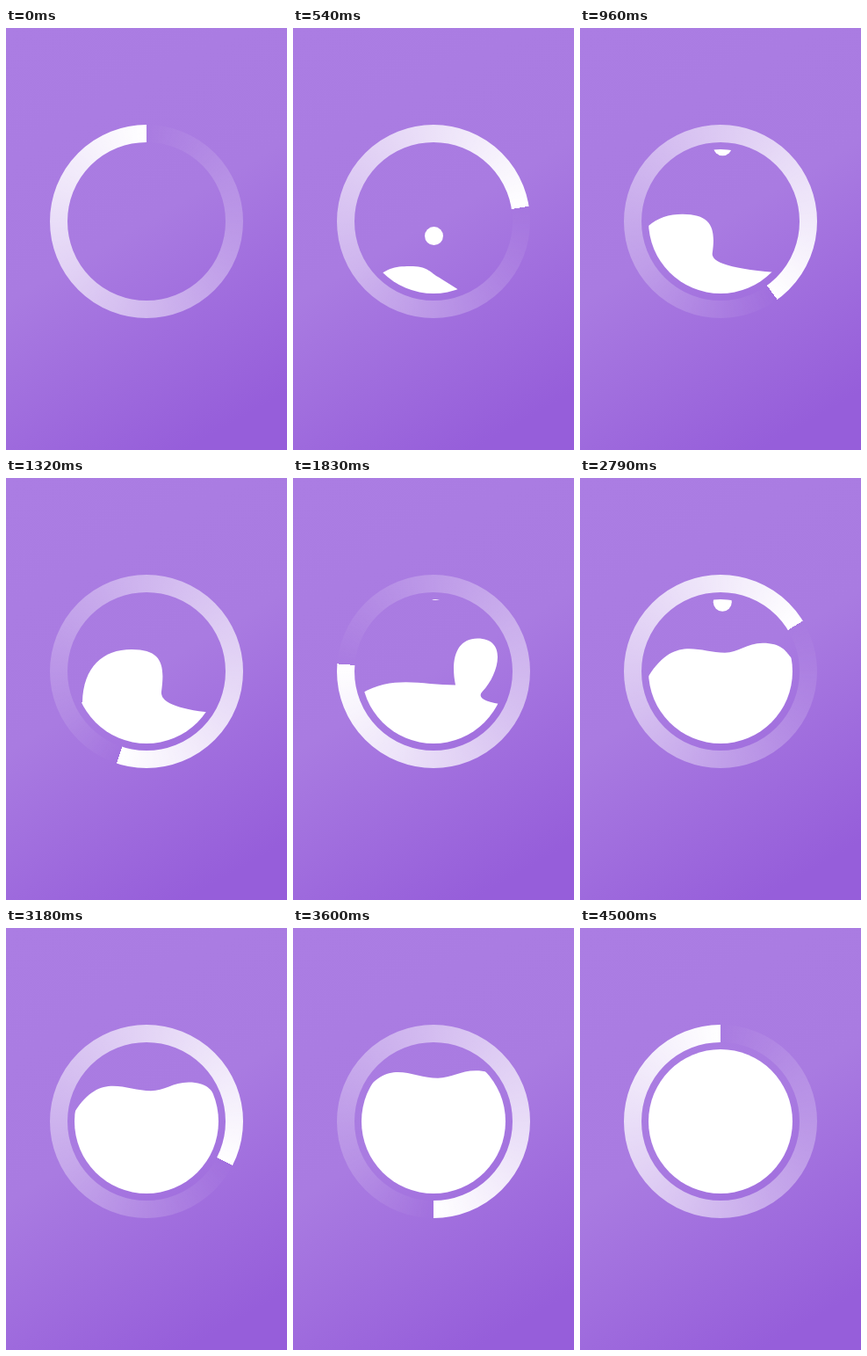
Animation, 320 px wide and 480 px high, one loop 4530 ms. Source, as an HTML page with a canvas:

```html
<!DOCTYPE html>
<html lang="en">
<head>
<meta charset="utf-8">
<title>Liquid loader</title>
<style>
  html, body { margin: 0; width: 100%; height: 100%; overflow: hidden; }
  body { background: #a87ae0; }
  canvas {
    display: block;
    width: 320px;
    height: 480px;
    background: linear-gradient(150deg, #ab7de3 0%, #a97be1 47%, #965eda 90%);
  }
</style>
</head>
<body>
<canvas id="stage" width="320" height="480"></canvas>
<script>
const ctx = document.getElementById('stage').getContext('2d');
const LOOP = 4530, STEP = 30;
const CX = 160, CY = 220, RING = 100, BOWL = 82;
const LEFT = 70, RIGHT = 245;

// Each pose has one crest between a neck and a foot, heights relative to the level.
// sides: left height, lift of the left shoulder, right height.
// out, back: curve handles at the neck and the foot.
const swell = {
  sides: [30, 10, 50], neck: [92, 4], out: [13, -14],
  crest: [133, -12.5], foot: [165, -0.5], back: [-10, -6]
};
const breaker = {
  sides: [20, 0, 11], neck: [87, -2], out: [1, -40],
  crest: [143, -62], foot: [177, -14], back: [4, -30]
};
const blob = {
  sides: [10.5, 28, 19], neck: [185, -4], out: [-6, -30],
  crest: [210, -57], foot: [216, 3], back: [17, -17]
};
const calm = {
  sides: [33, 65, 6], neck: [165, -8], out: [15, 0],
  crest: [208, -19], foot: [240, -3], back: [-6, -7]
};

// Slides a pose sideways, scales its height and tilts it
function vary(pose, dx, scale, tilt = 0) {
  const lean = x => (x - 170) * tilt;
  const move = ([x, y]) => [x + dx, y * scale + lean(x)];
  const [left, lift, right] = pose.sides;
  return {
    ...pose,
    sides: [left * scale + lean(LEFT), lift * scale, right * scale + lean(RIGHT)],
    neck: move(pose.neck), crest: move(pose.crest), foot: move(pose.foot),
    out: [pose.out[0], pose.out[1] * scale],
    back: [pose.back[0], pose.back[1] * scale]
  };
}

const waves = [
  [0, vary(swell, -25, 0)],
  [540, swell],
  [840, vary(breaker, -35, 0.9)],
  [1320, breaker],
  [1830, blob],
  [2190, vary(blob, 14, 0.6)],
  [2640, calm],
  [2790, calm],
  [3600, vary(calm, 0, 1, 0.06)]
];

const mix = (a, b, k) => a + (b - a) * k;

function poseAt(t) {
  let i = 0;
  while (i < waves.length - 2 && t >= waves[i + 1][0]) i++;
  const [t0, a] = waves[i], [t1, b] = waves[i + 1];
  const k = Math.min(1, (t - t0) / (t1 - t0));
  const pose = {};
  for (const key in a) pose[key] = a[key].map((v, n) => mix(v, b[key][n], k));
  return pose;
}

// Steady fill with a rush at the end
function percentAt(t) {
  const rush = Math.max(0, (t - 3780) / 720);
  return Math.min(100, t / 48 + 6.25 * rush * rush);
}

function drawRing(percent) {
  const head = percent / 50 * Math.PI * 2 - Math.PI / 2;
  const fade = ctx.createConicGradient(head, CX, CY);
  fade.addColorStop(0, 'rgba(255,255,255,0)');
  fade.addColorStop(1, '#fff');
  ctx.strokeStyle = fade;
  ctx.lineWidth = 20;
  ctx.beginPath();
  ctx.arc(CX, CY, RING, 0, Math.PI * 2);
  ctx.stroke();
}

function drawLiquid(t, level) {
  const { sides: [left, lift, right], neck, out, crest, foot, back } = poseAt(t);
  const [nx, ny] = neck, [cx, cy] = crest, [fx, fy] = foot;
  const reach = (nx - LEFT) * 0.35;
  const rise = Math.hypot(cx - nx, cy - ny) * 0.4;
  const drop = Math.hypot(cx - fx, cy - fy) * 0.6;
  ctx.save();
  ctx.translate(0, level);
  ctx.beginPath();
  ctx.moveTo(40, 300);
  ctx.lineTo(LEFT, left);
  ctx.bezierCurveTo(LEFT + reach, left - lift, nx - reach, ny, nx, ny);
  ctx.bezierCurveTo(nx + out[0], ny + out[1], cx - rise, cy, cx, cy);
  ctx.bezierCurveTo(cx + drop, cy, fx + back[0], fy + back[1], fx, fy);
  ctx.quadraticCurveTo(fx - back[0] * 0.65, fy - back[1] * 0.65, RIGHT, right);
  ctx.lineTo(280, 300);
  ctx.fill();
  ctx.restore();
}

function drawDrop(t) {
  const fall = (t + 870) % 900;
  ctx.beginPath();
  ctx.arc(162.5 - fall / 255, 128.5 + fall * 0.212, 10.5, 0, Math.PI * 2);
  ctx.fill();
}

function draw(t) {
  const percent = percentAt(t);
  ctx.clearRect(0, 0, 320, 480);
  drawRing(percent);
  ctx.save();
  ctx.beginPath();
  ctx.arc(CX, CY, BOWL, 0, Math.PI * 2);
  ctx.clip();
  ctx.fillStyle = '#fff';
  drawLiquid(t, CY + BOWL - percent / 100 * BOWL * 2);
  drawDrop(t);
  ctx.restore();
}

const start = performance.now();
function tick() {
  const t = (performance.now() - start) % LOOP;
  draw(Math.floor(t / STEP) * STEP);
  requestAnimationFrame(tick);
}
tick();
</script>
</body>
</html>
```
